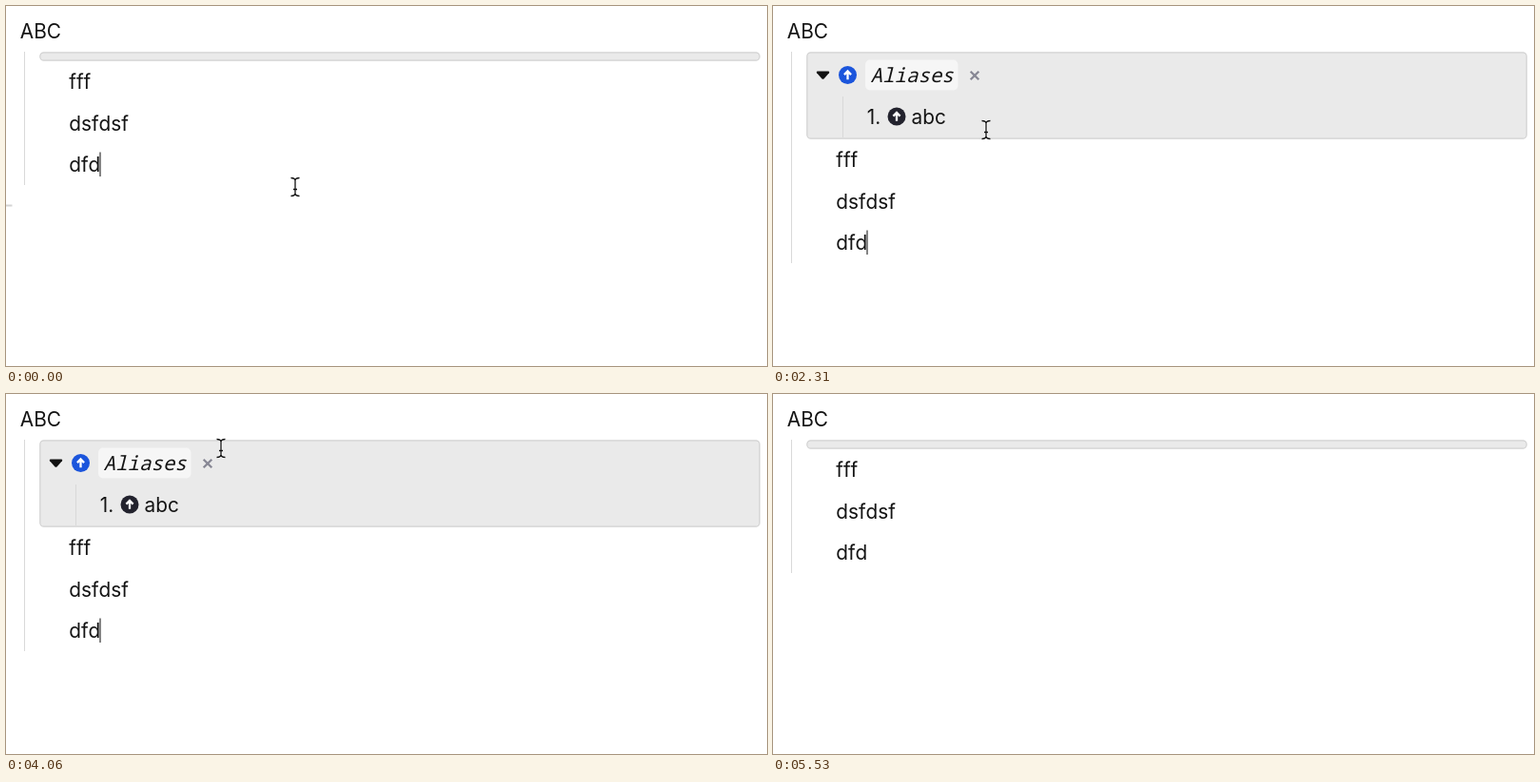
An HTML page that plays this animation: 800 px wide and 378 px high, repeating every 5810 ms.

```html
<!DOCTYPE html>
<html lang="en">
<head>
<meta charset="utf-8">
<title>Outline hover</title>
<style>
html, body { margin: 0; width: 100%; height: 100%; overflow: hidden; background: #fff; }
svg { display: block; width: 800px; height: 378px; }
text { font: 20.8px Inter, sans-serif; font-kerning: none; fill: #141414; }
.alias { font: italic 20.8px "Noto Sans Mono", monospace; }
.guide { stroke: #d9d9d9; }
.on { display: inline; }
.off { display: none; }
</style>
</head>
<body>
<svg viewBox="0 0 800 378">
  <defs>
    <g id="up">
      <circle r="9.5"/>
      <path d="M0 4.8V-3M-3.6 -.4L0 -4L3.6 -.4" fill="none" stroke="#fff" stroke-width="2.3"/>
    </g>
    <path id="beamShape" d="M-4.5 -9.5Q-.5 -9.5 0 -7Q.5 -9.5 4.5 -9.5M0 -7V7M-4.5 9.5Q-.5 9.5 0 7Q.5 9.5 4.5 9.5M-2 2.5H2" fill="none"/>
  </defs>
  <path id="dash" d="M0 209.5H6.5" stroke="#d4d4d4" stroke-width="2"/>
  <text x="14.8" y="34">ABC</text>
  <line id="guide" class="guide" x1="19.5" x2="19.5" y1="48" y2="188"/>
  <rect id="panel" x="35.8" y="48.8" width="756.4" height="8.4" rx="4" fill="#eaeaea" stroke="#d2d2d2" stroke-width="1.2"/>
  <g id="details">
    <path d="M46.5 68.5H58.5Q59.8 69 59 70.2L53.7 76.3Q52.5 77.4 51.3 76.3L46 70.2Q45.2 69 46.5 68.5Z" fill="#111"/>
    <use href="#up" x="78.5" y="72.5" fill="#1b55dc"/>
    <rect x="97" y="56.5" width="97.5" height="32" rx="5" fill="#f6f6f6"/>
    <text class="alias" x="102.5" y="80">Aliases</text>
    <path d="M207.7 68.7L216.3 77.3M216.3 68.7L207.7 77.3" stroke="#878794" stroke-width="2.3"/>
    <line class="guide" x1="73.5" x2="73.5" y1="95" y2="138"/>
    <text x="98.8" y="124">1.</text>
    <use href="#up" x="130" y="116" fill="#22222d"/>
    <text x="145.6" y="124">abc</text>
  </g>
  <g id="rows">
    <text x="66.2" y="87">fff</text>
    <text x="66.2" y="130.5">dsfdsf</text>
    <text x="66.2" y="174">dfd</text>
    <line id="caret" x1="99" x2="99" y1="153.5" y2="179" stroke="#333" stroke-width="1.2"/>
    <g id="handle" fill="#dadadf"></g>
  </g>
  <g id="cursor">
    <g id="beam">
      <use href="#beamShape" stroke="#fff" stroke-width="3"/>
      <use href="#beamShape" stroke="#111" stroke-width="1.3"/>
    </g>
    <g id="arrow">
      <path d="M1 1.5V19L5 15.3L8 22L11.3 20.6L8.4 14H14Z" fill="#000" opacity=".12"/>
      <path d="M0 -.5V17.5L4.2 13.6L7.2 20.6L10.6 19.1L7.6 12.4H13Z" fill="#111" stroke="#fff" stroke-width="1.4"/>
    </g>
  </g>
</svg>
<script>
const LOOP = 5810, STEP = 70, GROW = 82, BLINK = 525;
const ROW = 43.5, ROWS_TOP = 56, ROW_COUNT = 3;
const $ = id => document.getElementById(id);
const show = (id, on) => $(id).setAttribute('class', on ? 'on' : 'off');

// Key points of the pointer: time, x, y
const path = [
  [0, 304, 190], [490, 303, 190], [1050, 236, 176], [1610, 225, 52],
  [2100, 225, 52], [2310, 224, 130], [2590, 227, 160], [2940, 227, 99],
  [3430, 226, 57], [4340, 226, 57], [4690, 232, 138], [5180, 239, 338]
];

for (let i = 0; i < 6; i++) {
  const dot = document.createElementNS('http://www.w3.org/2000/svg', 'circle');
  dot.setAttribute('cx', 47 + i % 2 * 7);
  dot.setAttribute('cy', 72.5 + (i >> 1) * 7);
  dot.setAttribute('r', 2.6);
  $('handle').append(dot);
}

function pointer(t) {
  const i = path.findIndex(p => p[0] > t);
  if (i < 0) return path[path.length - 1].slice(1);
  const [a, b] = [path[i - 1], path[i]];
  const k = (t - a[0]) / (b[0] - a[0]);
  return [1, 2].map(n => a[n] + (b[n] - a[n]) * k);
}

// The panel opens twice, for 770 ms each time
const isOpen = t => t >= 1680 && (t - 1680) % 2310 < 770;

function draw(t) {
  const open = isOpen(t), grow = open ? GROW : 0;
  const [x, y] = pointer(t);
  const visible = t <= 5180;
  // The handle follows the pointer one step late
  const row = Math.floor((pointer(Math.max(0, t - STEP))[1] - ROWS_TOP) / ROW);
  const hover = visible && !open && row >= 0 && row < ROW_COUNT;
  const onEdge = y < 54 || open && Math.abs(y - 139) < 3;

  show('dash', t < STEP);
  show('details', open);
  show('caret', Math.floor((t + 280) / BLINK) % 2 === 0);
  show('handle', hover);
  show('cursor', visible);
  show('arrow', onEdge);
  show('beam', !onEdge);
  $('panel').setAttribute('height', 8.4 + grow);
  $('guide').setAttribute('y2', 188 + grow);
  $('rows').setAttribute('transform', `translate(0 ${grow})`);
  if (hover) $('handle').setAttribute('transform', `translate(0 ${row * ROW})`);
  $('cursor').setAttribute('transform', `translate(${x} ${y})`);
}

const start = performance.now();
function tick() {
  const t = (performance.now() - start) % LOOP;
  draw(Math.floor(t / STEP) * STEP);
  requestAnimationFrame(tick);
}
tick();
</script>
</body>
</html>
```
